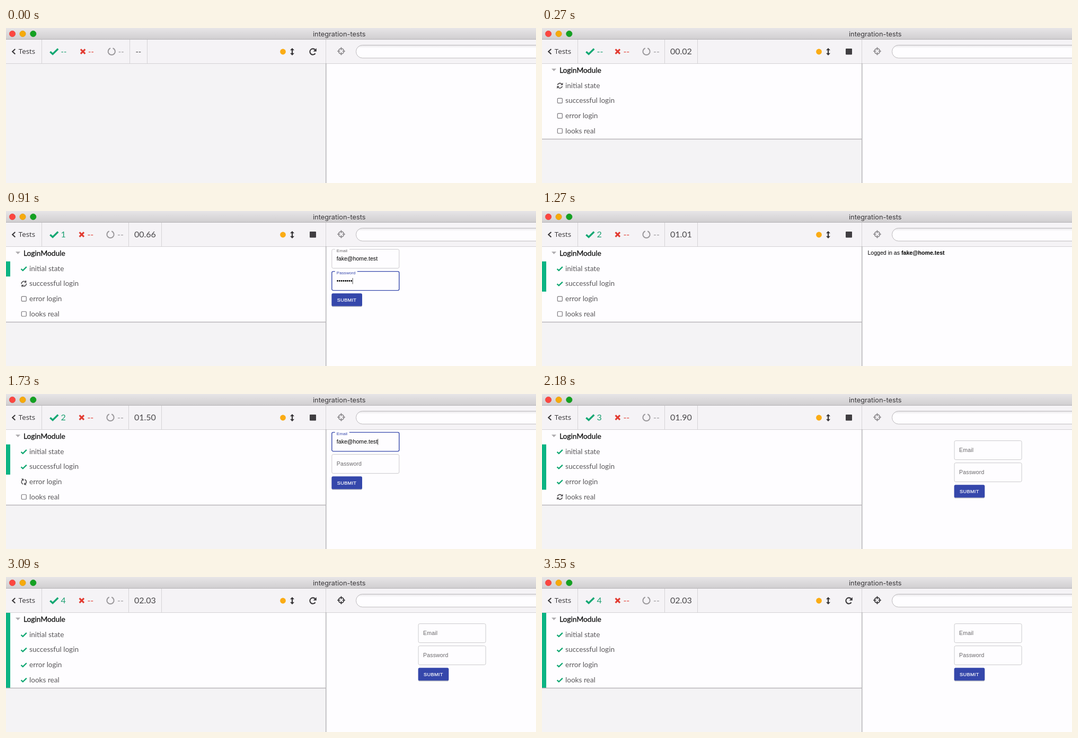
These frames come from a looping animation (1000 by 294 pixels, 3650 ms). An HTML page:

```html
<!DOCTYPE html>
<html lang="en">
<head>
<meta charset="utf-8">
<title>integration-tests</title>
<style>
  html, body { margin: 0; width: 100%; height: 100%; overflow: hidden; background: #f4f3f5; }
  svg { display: block; width: 100vw; height: 100vh; }
  text { white-space: pre; }
  .title { font: 12.8px Inter, sans-serif; fill: #3b393c; }
  .back { font: 13.3px "Open Sans", sans-serif; fill: #333134; }
  .stat { font: 16px Lato, sans-serif; }
  .suite { font: 13.8px Lato, sans-serif; fill: #111; stroke: #111; stroke-width: .3px; }
  .test { font: 13.6px Lato, sans-serif; fill: #5a585b; }
  .page { font: 10.6px "Liberation Sans", Arial, sans-serif; fill: #000; }
  .label { font: 10.6px "Liberation Sans", Arial, sans-serif; letter-spacing: .00938em; fill: #6b696c; }
  .small { font-size: 8px; }
  .submit { font: 9.24px "Liberation Sans", Arial, sans-serif; letter-spacing: .02857em;
    fill: #fff; stroke: #fff; stroke-width: .2px; }
  .line { fill: none; stroke-linecap: butt; }
</style>
</head>
<body>
<svg viewBox="0 0 1000 294" preserveAspectRatio="none">
  <defs>
    <linearGradient id="bar" x2="0" y2="1">
      <stop stop-color="#e7e5e7"/><stop offset="1" stop-color="#d0ced0"/>
    </linearGradient>
    <linearGradient id="inset" x2="0" y2="1">
      <stop stop-color="#e6e4e7"/><stop offset=".22" stop-color="#fefdff"/>
    </linearGradient>
    <g id="tick"><path class="line" d="M-7 .6L-2.6 4.6L6.6-4.4" stroke="#12a873" stroke-width="3.1"/></g>
    <g id="box"><rect x="-4.5" y="-4.5" width="9" height="9" rx="1.4" fill="none" stroke="#78767a" stroke-width="1.2"/></g>
    <g id="sync">
      <path class="line" d="M-4.5-1A4.6 4.6 0 0 1 3.3-3.2M4.5 1A4.6 4.6 0 0 1-3.3 3.2" stroke="#4a484b" stroke-width="1.6"/>
      <path d="M5.6-5.6V-1H1zM-5.6 5.6V1H-1z" fill="#4a484b"/>
    </g>
  </defs>

  <rect width="1000" height="294" fill="#f4f3f5"/>
  <rect width="1000" height="21.5" fill="url(#bar)"/>
  <rect y="21" width="1000" height="1" fill="#b3b1b4"/>
  <circle cx="12" cy="11" r="5.7" fill="#fc4640" stroke="#df3a36" stroke-width=".6"/>
  <circle cx="31.5" cy="11" r="5.7" fill="#f6aa0c" stroke="#dc970b" stroke-width=".6"/>
  <circle cx="51.3" cy="11" r="5.7" fill="#14a122" stroke="#128f1e" stroke-width=".6"/>
  <text class="title" x="579" y="15.6">integration-tests</text>

  <rect y="22" width="1000" height="45" fill="#f5f3f6"/>
  <rect x="604" y="67" width="396" height="227" fill="#fefdff"/>
  <rect y="67" width="1000" height="1" fill="#d3d1d4"/>
  <path class="line" d="M17.3 40L12.2 44.7L17.3 49.4" stroke="#3a383b" stroke-width="2.1"/>
  <text class="back" x="23.8" y="49.4">Tests</text>
  <path class="line" d="M67.5 22V67M603.5 22V67" stroke="#d5d3d6"/>
  <path id="splits" class="line" stroke="#d5d3d6"/>

  <use href="#tick" transform="translate(91 44.4) scale(1.1)"/>
  <text id="passed" class="stat" x="104" fill="#1a9f70"></text>
  <path id="cross" class="line" d="M-4.2-4.2L4.2 4.2M4.2-4.2L-4.2 4.2" stroke="#e23a30" stroke-width="3.1"/>
  <text id="failed" class="stat" fill="#e23a30">--</text>
  <path id="ring" class="line" d="M2.3-6.2A6.6 6.6 0 1 1-2.3-6.2" stroke="#99979a" stroke-width="2"/>
  <text id="waiting" class="stat" fill="#99979a">--</text>
  <text id="clock" class="stat" fill="#4a484b"></text>

  <circle cx="522.5" cy="45" r="5.4" fill="#fbac14"/>
  <path d="M540 38l4 4.2h-2.9v5.6h2.9l-4 4.2l-4-4.2h2.9v-5.6h-2.9z" fill="#353336"/>
  <g id="reload">
    <path class="line" d="M583.2 41.3A5.6 5.6 0 1 0 583.6 48.2" stroke="#3a383b" stroke-width="2.1"/>
    <path d="M585.8 38.2V44.4H579.6z" fill="#3a383b"/>
  </g>
  <rect id="stop" x="573" y="39" width="12" height="11.6" rx="1" fill="#403e41"/>
  <g id="aim" class="line" stroke-width="1.7">
    <circle cx="632.5" cy="44" r="5.1"/>
    <path d="M632.5 36.6v5.4M632.5 46v5.4M625.1 44h5.4M634.5 44h5.4"/>
  </g>
  <rect x="660.5" y="32.5" width="380" height="24.5" rx="12.2" fill="url(#inset)" stroke="#bbb9bc"/>

  <g id="list">
    <rect y="68" width="603" height="142" fill="#fefdff"/>
    <rect y="210" width="603" height="1.2" fill="#adabae"/>
    <rect y="211.2" width="603" height="1" fill="#e4e2e5"/>
    <rect id="stripe" width="8" fill="#0bb483"/>
    <path d="M18 77h9l-4.5 5z" fill="#b0aeb1"/>
    <text class="suite" x="33" y="85">LoginModule</text>
  </g>
  <rect x="603" y="67" width="1.4" height="227" fill="#b1afb2"/>
  <rect x="604.4" y="68" width="1" height="226" fill="#e7e5e8"/>

  <g id="form"></g>
  <text id="welcome" class="page" x="614.4" y="83.2">Logged in as <tspan font-weight="700" id="who"></tspan></text>
</svg>

<script>
const LOOP = 3650;
const EMAIL = 'fake@home.test';
const SECRET = '•'.repeat(8);
const BLUE = '#3547ab';
const BUILD = 90, START = 270, DONE = 2360;

const TESTS = [
  { name: 'initial state', from: 270, to: 460 },
  { name: 'successful login', from: 460, to: 1270 },
  { name: 'error login', from: 1460, to: 2090 },
  { name: 'looks real', from: 2180, to: DONE }
];

// time in ms, elapsed hundredths of a second
const CLOCK = [[270, 2], [550, 30], [1270, 101], [1730, 150], [2180, 190], [2360, 203]];

// what the tested page shows from each time on; email, secret: start of typing
const PAGES = [
  { at: 0 },
  { at: 360, form: [0, 0] },
  { at: 460, form: [0, 0], email: 530, secret: 780, click: 1090 },
  { at: 1180, welcome: true },
  { at: 1460, form: [0, 0], email: 1580, secret: 1780, click: 2090 },
  { at: 2180, form: [163.3, 16] }
];

const STEPS = Array.from({ length: 40 }, (_, k) => 90 * k + 10 * Math.floor(k / 11 + 0.6));

const $ = id => document.getElementById(id);
const show = (el, on) => { el.style.display = on ? '' : 'none'; };

function add(parent, tag, attrs, text) {
  const el = document.createElementNS('http://www.w3.org/2000/svg', tag);
  for (const key in attrs) el.setAttribute(key, attrs[key]);
  if (text) el.textContent = text;
  parent.append(el);
  return el;
}

function makeField(name, y, gap) {
  const g = add($('form'), 'g', { transform: `translate(614.8 ${y})` });
  const frame = add(g, 'rect', { width: 127, height: 36, rx: 2.6, fill: '#fefdff' });
  const notch = add(g, 'rect', { x: 6, y: -1.5, width: gap, height: 3, fill: '#fefdff' });
  const label = add(g, 'text', { class: 'label' }, name);
  const value = add(g, 'text', { class: 'page', x: 9, y: 21.8 });
  const caret = add(g, 'rect', { y: 12.5, width: 0.8, height: 11.5, fill: '#222' });
  return (text, focus) => {
    const raised = focus || text.length > 0;
    frame.setAttribute('stroke', focus ? BLUE : '#c6c4c7');
    frame.setAttribute('stroke-width', focus ? 1.4 : 0.9);
    show(notch, raised);
    label.setAttribute('class', raised ? 'label small' : 'label');
    label.setAttribute('x', 9);
    label.setAttribute('y', raised ? 5.6 : 21.8);
    label.style.fill = focus ? BLUE : '';
    value.textContent = text;
    show(caret, focus);
    if (focus) caret.setAttribute('x', 9.2 + (text ? value.getComputedTextLength() : 0));
  };
}

const setEmail = makeField('Email', 72.6, 27);
const setSecret = makeField('Password', 114.6, 42);
add($('form'), 'rect', { x: 614.4, y: 157.6, width: 57.6, height: 24.4, rx: 2.8, fill: '#000', opacity: 0.2 });
const button = add($('form'), 'rect', { x: 614.4, y: 156.3, width: 57.6, height: 24.2, rx: 2.6 });
add($('form'), 'text', { class: 'submit', x: 624.8, y: 171.8 }, 'SUBMIT');
$('who').textContent = EMAIL;

TESTS.forEach((test, i) => {
  const y = 109.3 + i * 28.65;
  test.y = y;
  test.icon = add($('list'), 'use', {});
  add($('list'), 'text', { class: 'test', x: 44, y: y + 4.4 }, test.name);
});

function elapsed(t) {
  const i = CLOCK.findIndex(([at]) => at >= t);
  if (i < 0) return CLOCK.at(-1)[1];
  if (i === 0) return CLOCK[0][1];
  const [t0, v0] = CLOCK[i - 1], [t1, v1] = CLOCK[i];
  return Math.round(v0 + (v1 - v0) * (t - t0) / (t1 - t0));
}

function place(el, x, size) {
  el.setAttribute('x', x);
  el.setAttribute('y', 50);
  el.style.fontSize = size + 'px';
}

function drawToolbar(t, passes) {
  const wide = t >= START;
  const busy = t >= BUILD && t < DONE;
  const size = wide ? 16 : 14.5;
  const shift = wide ? 0 : 2.3;
  $('splits').setAttribute('d', wide ? 'M231.5 22V67M293.5 22V67' : 'M233.5 22V67M266.5 22V67');
  $('cross').setAttribute('transform', `translate(${142.8 + shift} 44.6)`);
  $('ring').setAttribute('transform', `translate(${197 + shift} 44.5)`);
  place($('passed'), 103.6, size);
  place($('failed'), 153.4 + shift * 0.7, size);
  place($('waiting'), 210 + shift * 0.8, size);
  place($('clock'), wide ? 242 : 244.4, size);
  $('passed').textContent = passes || '--';
  const hundredths = elapsed(t);
  const pad = n => String(n).padStart(2, '0');
  $('clock').textContent = wide ? `${pad(Math.floor(hundredths / 100))}.${pad(hundredths % 100)}` : '--';
  show($('stop'), busy);
  show($('reload'), !busy);
  $('aim').setAttribute('stroke', t >= DONE ? '#363437' : '#8d8b8e');
}

function drawList(t, passes) {
  show($('list'), t >= BUILD);
  const done = t >= DONE;
  $('stripe').setAttribute('y', done ? 68 : 95.6);
  $('stripe').setAttribute('height', done ? 142 : passes * 28.65);
  for (const { icon, from, to, y } of TESTS) {
    const state = t >= to ? 'tick' : t >= from ? 'sync' : 'box';
    const turn = state === 'sync' ? ` rotate(${(t - from) * 0.36})` : '';
    const scale = state === 'tick' ? ' scale(.76)' : '';
    icon.setAttribute('href', '#' + state);
    icon.setAttribute('transform', `translate(33.8 ${y})${turn}${scale}`);
  }
}

function drawPage(t) {
  const page = PAGES.findLast(p => t >= p.at);
  show($('welcome'), page.welcome);
  show($('form'), page.form);
  if (!page.form) return;
  const typed = (text, from) => text.slice(0, Math.max(0, Math.floor((t - from) / 10)) || 0);
  $('form').setAttribute('transform', `translate(${page.form})`);
  setEmail(typed(EMAIL, page.email), t >= page.email && t < page.secret);
  setSecret(typed(SECRET, page.secret), t >= page.secret && t < page.click);
  button.setAttribute('fill', t >= page.click ? '#2c3b98' : BLUE);
}

function draw(now) {
  const time = now % LOOP;
  const t = STEPS.findLast(s => s <= time);
  const passes = TESTS.filter(test => t >= test.to).length;
  drawToolbar(t, passes);
  drawList(t, passes);
  drawPage(t);
}

const begin = performance.now();
function tick() {
  draw(performance.now() - begin);
  requestAnimationFrame(tick);
}
tick();
</script>
</body>
</html>
```
